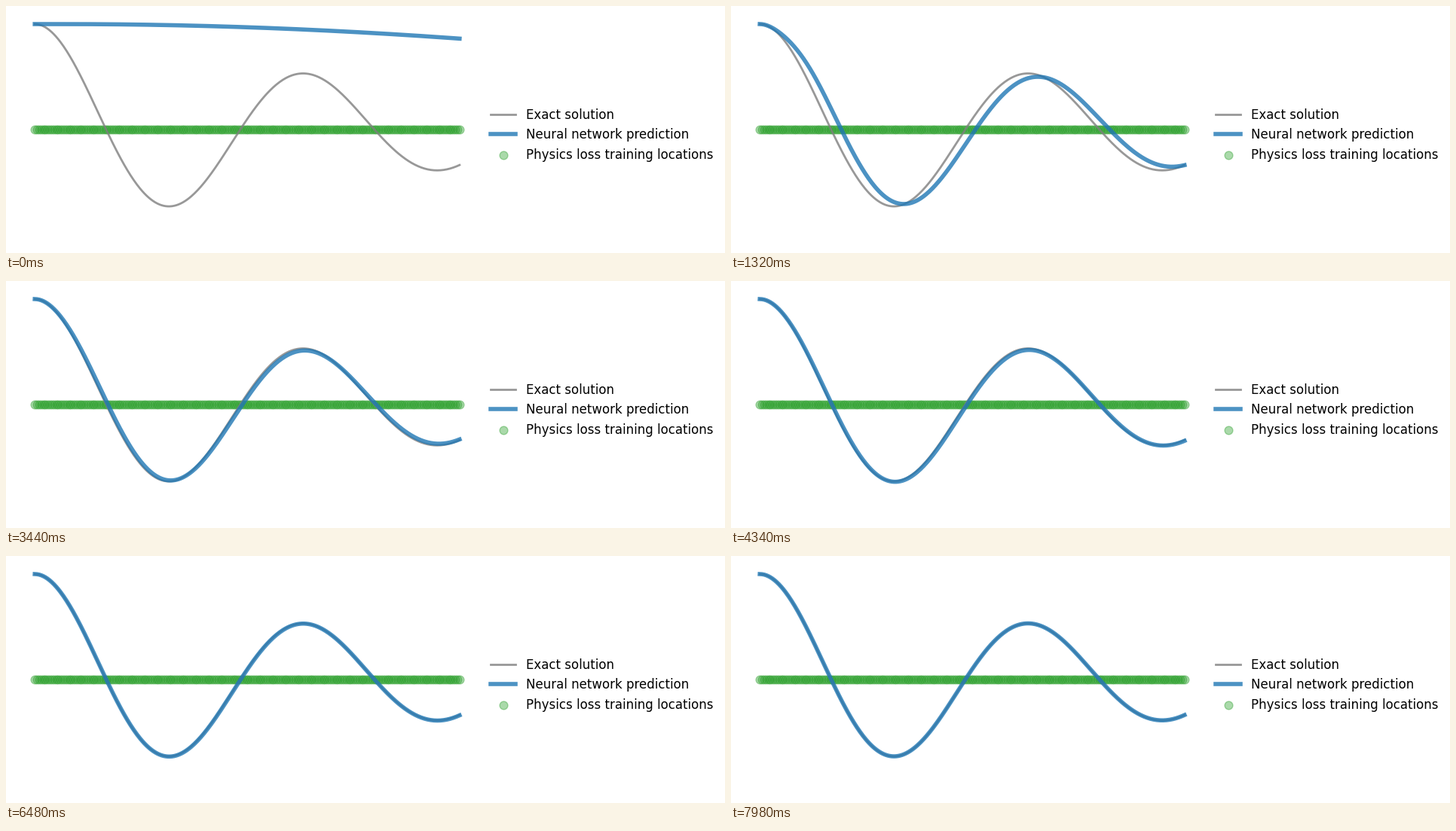
A matplotlib script for the animation above (8000 ms loop, 954 by 328 pixels).

```python
import numpy as np
import matplotlib.pyplot as plt
from matplotlib.animation import FuncAnimation

W, H, DPI = 954, 328, 100
FRAMES, STEP = 400, 20
PX_X, PX_Y = 620 / 1.1, 308 / 2.2  # pixels per data unit
W_START, W_TRUE = 0.57, np.sqrt(99)
D_TRUE = 1
WARMUP = 38  # frames until the oscillation has formed

plt.rcParams["font.family"] = "DejaVu Sans"
t = np.linspace(0, 1, 400)
onset = 1 - np.exp(-(t / 0.09) ** 2)  # the start value stays fixed


def oscillator(t, d, w):
    """Damped oscillation starting at rest from 1."""
    return np.exp(-d * t) * (np.cos(w * t) + d / w * np.sin(w * t))


def smooth_noise(seed, size, width=4):
    """Seeded optimizer wobble, faded in over the first frames."""
    rng = np.random.default_rng(seed)
    kernel = np.exp(-np.linspace(-2, 2, 4 * width + 1) ** 2)
    noise = np.convolve(rng.normal(size=FRAMES + 4 * width), kernel, "valid")
    return size * noise / noise.std() * np.clip(np.arange(FRAMES) / 80, 0, 1)


wobble = smooth_noise(seed=4, size=0.8)


def prediction(i):
    p = min(i / WARMUP, 1)
    w = W_START + (W_TRUE - W_START) * (1 - (1 - p) ** 3)
    excess = 0.1 * np.exp(-(i / 190) ** 4)
    d = p * (D_TRUE + excess) + 2.5 * np.sin(np.pi * p)

    # Late in training the curve sags once before settling
    sag = np.exp(-((i - 261) / 40) ** 2)
    lag = 37.7 * np.exp(-i / 62) + 1.5 * sag
    drop = 4.5 * sag + wobble[i]
    return oscillator(t - lag / PX_X * onset, d, w) - drop / PX_Y * onset


fig = plt.figure(figsize=((W + 0.01) / DPI, (H + 0.01) / DPI), dpi=DPI,
                 facecolor="white")
ax = fig.add_axes([10 / W, 10 / H, 620 / W, 308 / H])
ax.set(xlim=(-0.05, 1.05), ylim=(-1.1, 1.1))
ax.axis("off")

ax.plot(t, oscillator(t, D_TRUE, W_TRUE), color="tab:gray", lw=2, alpha=0.8,
        label="Exact solution")
line, = ax.plot(t, prediction(0), color="tab:blue", lw=4, alpha=0.8,
                label="Neural network prediction")
points = np.linspace(0, 1, 200)
ax.scatter(points, 0 * points, s=60, lw=1, color="tab:green", alpha=0.4,
           label="Physics loss training locations")
ax.legend(loc=(1.01, 0.34), frameon=False, fontsize=12)


def update(i):
    line.set_ydata(prediction(i))
    return line,


anim = FuncAnimation(fig, update, frames=FRAMES, interval=STEP,
                     repeat=True, repeat_delay=0)
plt.show()
```
